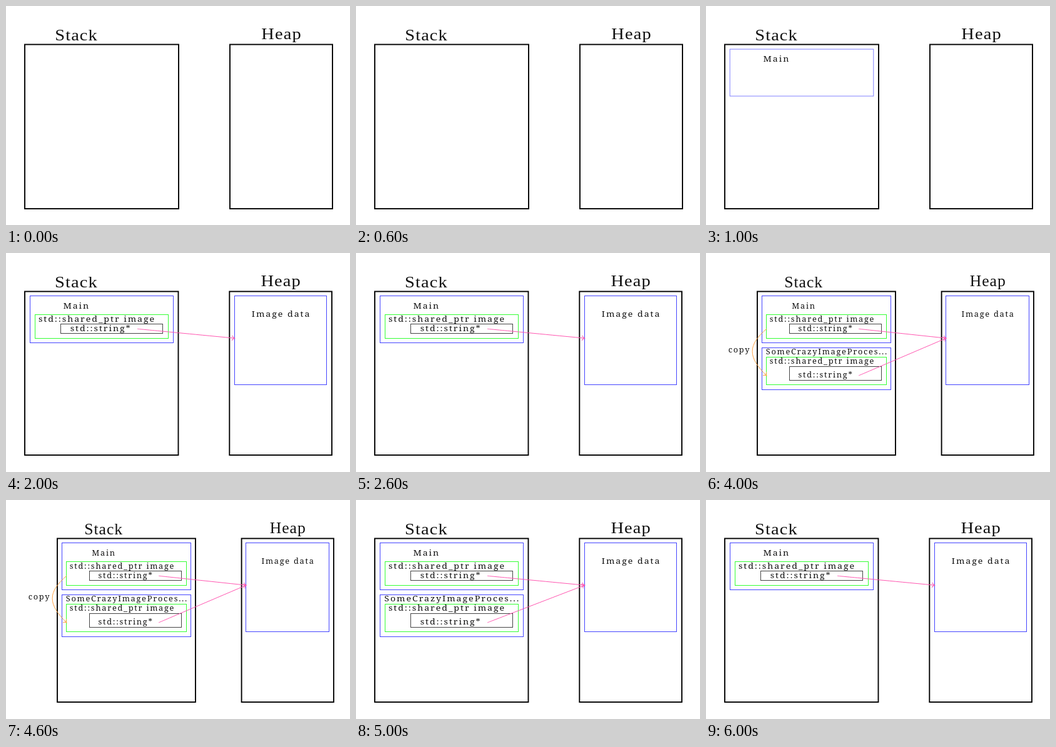
These frames come from a looping animation (550x350 px, 7 s). An HTML page with a canvas:

```html
<!DOCTYPE html>
<html lang="en">
<head>
<meta charset="utf-8">
<title>Stack and heap</title>
<style>
  html, body { margin: 0; width: 100%; height: 100%; overflow: hidden; background: #fff; }
  canvas { display: block; }
</style>
</head>
<body>
<canvas id="stage" width="550" height="350"></canvas>
<script>
const ctx = document.getElementById('stage').getContext('2d');
const STEP = 1000;
const BLUE = '#4444ff', GREEN = '#33ff33', GREY = '#444', PINK = '#ff55b0', ORANGE = '#ffa040';

// Everything sits on a grid: left edge, top edge and cell size in pixels.
const soft = { left: 30, top: 61.5, w: 8.2, h: 7.5, blue: '#8080ff' };
const sharp = { left: 30, top: 61.5, w: 8.183, h: 7.47, blue: BLUE, snap: true };
const narrow = { ...sharp, left: 82, w: 7.365 };
let grid;

const px = x => grid.left + x * grid.w;
const py = y => grid.top + y * grid.h;

function frame(x, y, w, h) {
  ctx.strokeStyle = '#000';
  ctx.lineWidth = 1.9;
  ctx.strokeRect(px(x), py(y), w * grid.w, h * grid.h);
}

function box(color, x, y, w, h) {
  const snap = v => grid.snap ? Math.floor(v) + 0.5 : v;
  const left = snap(px(x)), top = snap(py(y));
  ctx.strokeStyle = color;
  ctx.lineWidth = 1;
  ctx.strokeRect(left, top, snap(px(x + w)) - left, snap(py(y + h)) - top);
}

// Centres the inked area of the text on a grid point.
function label(text, x, y, font = '13px "Noto Serif", serif', spacing = 1.75) {
  ctx.save();
  ctx.translate(px(x), py(y));
  ctx.scale(grid.w / grid.h, 1);
  ctx.font = font;
  ctx.letterSpacing = spacing + 'px';
  ctx.fillStyle = '#111';
  const m = ctx.measureText(text);
  ctx.fillText(text, (spacing - m.width) / 2,
    (m.actualBoundingBoxAscent - m.actualBoundingBoxDescent) / 2);
  ctx.restore();
}

const title = (text, x) => label(text, x, -2, '26px "Liberation Serif", serif', 1);

// Points are start, two controls and tip.
function arrow(color, ...points) {
  const [a, b, c, tip] = points.map(([x, y]) => [px(x), py(y)]);
  ctx.save();
  ctx.strokeStyle = color;
  ctx.lineWidth = 1;
  ctx.beginPath();
  ctx.moveTo(...a);
  ctx.bezierCurveTo(...b, ...c, ...tip);
  ctx.stroke();
  ctx.translate(...tip);
  ctx.rotate(Math.atan2(tip[1] - c[1], tip[0] - c[0]));
  ctx.beginPath();
  ctx.moveTo(-4, -4);
  ctx.quadraticCurveTo(-3, -1, 0, 0);
  ctx.quadraticCurveTo(-3, 1, -4, 4);
  ctx.stroke();
  ctx.restore();
}

function memory() {
  title('Stack', 10);
  title('Heap', 50);
  frame(0, 0, 30, 35);
  frame(40, 0, 20, 35);
}

function main() {
  box(grid.blue, 1, 1, 28, 10);
  label('Main', 10, 3);
}

function pointer(top, height, row) {
  box(GREEN, 2, top, 26, height);
  label('std::shared_ptr image', 14, top + 1);
  box(GREY, 7, top + 2, 20, height - 3);
  label('std::string*', 14.75, row);
  arrow(PINK, [22, row], [22, row], [22, row], [41, 10]);
}

function image() {
  box(BLUE, 41, 1, 18, 19);
  label('Image data', 50, 5);
  pointer(5, 5, 8);
}

function call() {
  box(BLUE, 1, 12, 28, 9);
  label('SomeCrazyImageProces...', 15, 13);
}

const callPointer = () => pointer(14, 6, 18);

function copy() {
  arrow(ORANGE, [2, 8], [-2.1, 11.5], [-2.1, 14], [2, 18]);
  label('copy', -4, 12.8);
}

const scenes = [
  [soft, memory],
  [soft, memory, main],
  [sharp, memory, main, image],
  [sharp, memory, main, image, call],
  [narrow, memory, main, image, call, callPointer, copy],
  [sharp, memory, main, image, call, callPointer],
  [sharp, memory, main, image]
];

const start = performance.now();

function draw() {
  const time = Math.max(0, performance.now() - start);
  const [layout, ...parts] = scenes[Math.floor(time / STEP) % scenes.length];
  grid = layout;
  ctx.fillStyle = '#fff';
  ctx.fillRect(0, 0, 550, 350);
  parts.forEach(part => part());
  requestAnimationFrame(draw);
}
draw();
</script>
</body>
</html>
```
